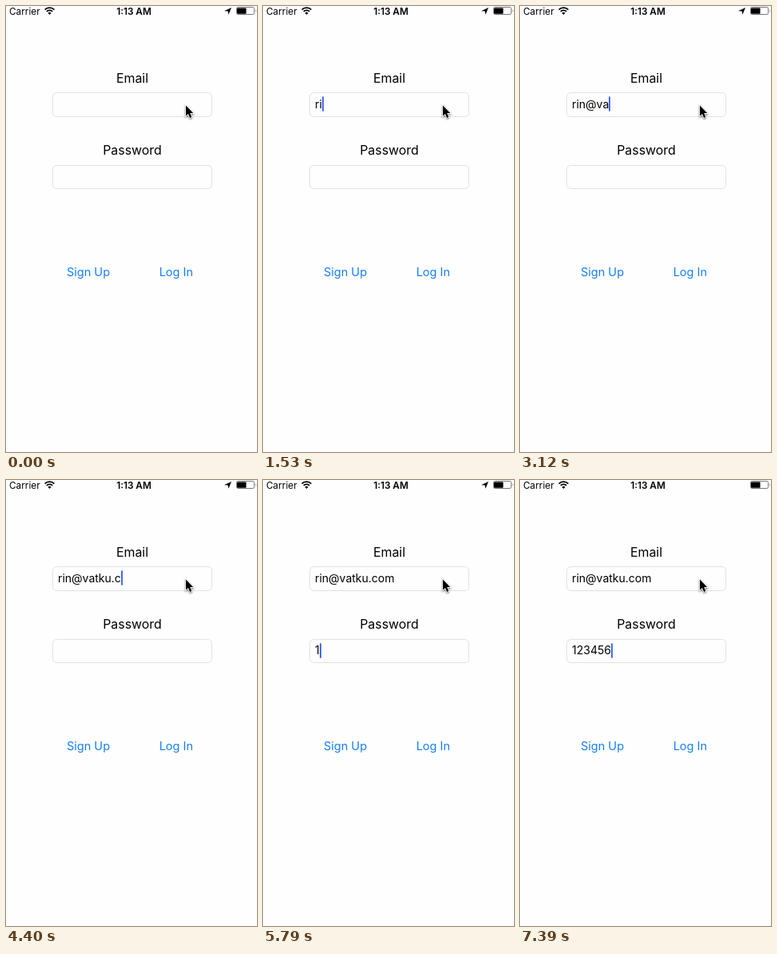
Write an HTML page that moves like this. It is 314 px wide and 558 px high and loops after 8000 ms.

```html
<!DOCTYPE html>
<html lang="en">
<head>
<meta charset="utf-8">
<title>Sign-in form</title>
<style>
  html, body { margin: 0; width: 100%; height: 100%; overflow: hidden; background: #fefefe; }
  svg { display: block; width: 100%; height: 100%; font-family: Inter, sans-serif; }
  .status { font-size: 11.8px; }
  .label { font-size: 15.9px; text-anchor: middle; }
  .button { font-size: 14.5px; text-anchor: middle; fill: #147efb; }
  .input { font-size: 14px; }
  .field { fill: #fefefe; stroke: #e1e1e1; }
</style>
</head>
<body>
<svg viewBox="0 0 314 558">
  <!-- status bar -->
  <text class="status" x="4" y="10.5">Carrier</text>
  <g fill="none" stroke="#000" stroke-width="1.7">
    <path d="M48.6 4.6A8.4 8.4 0 0 1 60.4 4.6M50.8 6.9A5.2 5.2 0 0 1 58.2 6.9"/>
    <path d="M54.5 10.9L52.4 8.7A3 3 0 0 1 56.6 8.7Z" fill="#000" stroke="none"/>
  </g>
  <text class="status" x="160" y="10.5" text-anchor="middle" font-weight="600">1:13 AM</text>
  <path id="location" d="M282 2L278.4 10.8L277.6 6.5L273 6.2Z"/>
  <rect x="288.5" y="1.5" width="22" height="9" rx="1.8" fill="none" stroke="#777"/>
  <rect x="289" y="2.4" width="11.5" height="7.4" rx=".8"/>
  <path d="M312 4.3Q313.6 6 312 7.7Z" fill="#555"/>

  <!-- form -->
  <text class="label" x="158" y="96">Email</text>
  <rect class="field" x="58.5" y="108.5" width="199" height="30" rx="5"/>
  <text class="label" x="158" y="186">Password</text>
  <rect class="field" x="58.5" y="199.5" width="199" height="29" rx="5"/>
  <text class="button" x="103" y="337.5">Sign Up</text>
  <text class="button" x="212.8" y="337.5">Log In</text>

  <rect id="highlight" x="62" y="113" width="21" height="19" fill="#c9d9ee"/>
  <text id="email" class="input" x="65" y="128"></text>
  <text id="password" class="input" x="65" y="218"></text>
  <rect id="caret" width="2" height="18.6" rx=".8" fill="#426bf2"/>

  <g id="suggestion">
    <path d="M62.5 133.5H95.5A10.25 10.25 0 0 1 95.5 154.5H62.5Z" fill="#fff" stroke="#c4c4c4"/>
    <text x="65" y="149.3" font-size="14" fill="#147efb">run</text>
    <path d="M90.3 140.3L98 148M98 140.3L90.3 148" stroke="#bdbdbd" stroke-width="1.2"/>
  </g>

  <!-- mouse pointer -->
  <path d="M225 124.5V137.6L228 134.9L230.1 139.9L232.3 139L230.2 134.1H234.2Z"
        stroke="#fff" stroke-width="1.6" paint-order="stroke" style="filter:drop-shadow(0 1px 1px #0009)"/>
</svg>
<script>
const DURATION = 8000, FADE_STEP = 28, FADE_STEPS = 6;
const EMAIL = 'rin@vatku.com', PASSWORD = '123456';
const FOCUS_EMAIL = 510, FOCUS_PASSWORD = 5370;
const emailKeys = [1470, 1510, 1550, 2240, 2940, 3120, 3210, 3350, 3860, 4220, 4400, 4550, 4640];
const passwordKeys = [5790, 5910, 5990, 6290, 6590, 7390];
const blinks = [1100, 2150, 2860, 5260, 7220];
const resets = [FOCUS_EMAIL, ...emailKeys, FOCUS_PASSWORD, ...passwordKeys];

const $ = id => document.getElementById(id);
const show = (id, visible) => $(id).style.display = visible ? '' : 'none';
const typed = (text, keys, t) => text.slice(0, keys.filter(k => k <= t).length);
const latest = (times, t) => Math.max(-1, ...times.filter(x => x <= t));

// The caret fades out in steps and stays hidden until the next key press.
function caretOpacity(t) {
  if (t < FOCUS_EMAIL) return 0;
  const blink = latest(blinks, t);
  if (blink < latest(resets, t)) return 1;
  return Math.max(0, 1 - (Math.floor((t - blink) / FADE_STEP) + 1) / FADE_STEPS);
}

function render(t) {
  $('email').textContent = typed(EMAIL, emailKeys, t);
  $('password').textContent = typed(PASSWORD, passwordKeys, t);

  const onPassword = t >= FOCUS_PASSWORD;
  const input = $(onPassword ? 'password' : 'email');
  const width = input.textContent ? input.getComputedTextLength() : 0;
  $('caret').setAttribute('x', Math.round(65 + width));
  $('caret').setAttribute('y', onPassword ? 204.2 : 113.2);
  $('caret').setAttribute('opacity', caretOpacity(t));

  const suggesting = t >= 1760 && t < 2240;
  show('highlight', suggesting);
  show('suggestion', suggesting);
  show('location', t < 6290);
}

const start = performance.now();
function frame() {
  render((performance.now() - start) % DURATION);
  requestAnimationFrame(frame);
}
frame();
</script>
</body>
</html>
```
